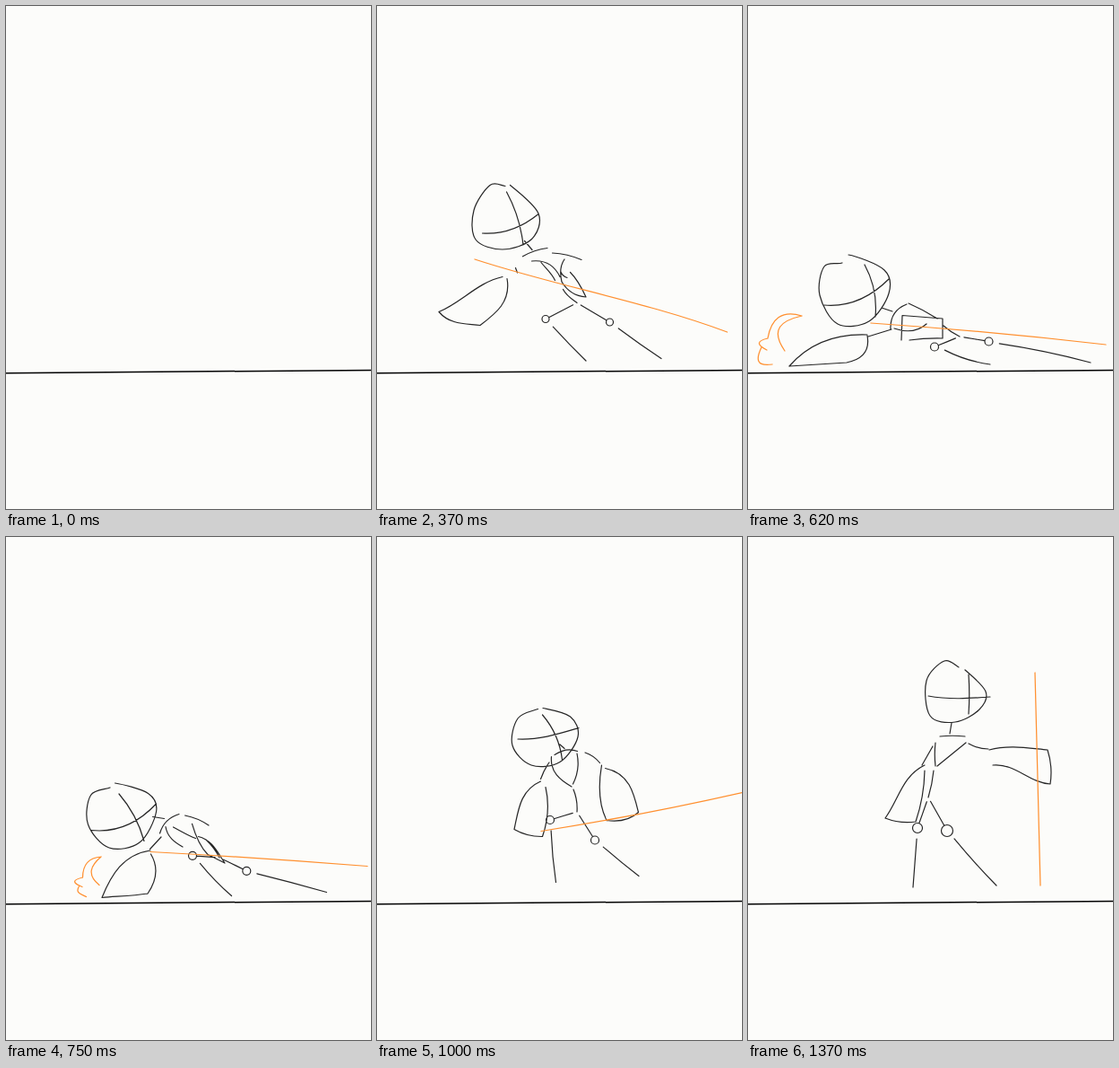
These frames come from a looping animation (407x560 px, 1.5 s). An HTML page:

```html
<!DOCTYPE html>
<html lang="en">
<head>
<meta charset="utf-8">
<title>Stick figure with staff</title>
<style>
html, body { margin: 0; width: 100%; height: 100%; overflow: hidden; background: #fcfcfa; }
svg { display: block; width: 407px; height: 560px; }
path { fill: none; stroke-linecap: round; stroke-linejoin: round; }
</style>
</head>
<body>
<svg viewBox="0 0 407 560">
  <path d="M0 408.7L407 405.4" stroke="#000" stroke-width="1.5"/>
  <path id="ink" stroke="#262626" stroke-width="1.2"/>
  <path id="staff" stroke="#ff9030" stroke-width="1.25"/>
</svg>
<script>
// A stroke runs from one point to another; the bows push its two thirds sideways.
const s = (x1, y1, x2, y2, bow = 0, bow2 = bow) => [x1, y1, x2, y2, bow, bow2];
// A leg is a knee with its radius, a foot and the bow of the shin.
const leg = (x, y, r, footX, footY, bow = 0) => [x, y, r, footX, footY, bow];
// A forearm has two sides; the cuff joins their ends.
const forearm = (outer, inner, bow = 0, bow2 = bow) => ({ outer, inner, cuff: [bow, bow2] });

const lean = {
  head: [[166, 129], [152, 128], [133, 160], [133, 191], [165, 199], [197, 188], [203, 162], [171, 132]],
  body: [
    s(172, 137, 179, 199, -4), s(144, 170, 199, 163, 4),
    s(174, 199, 176, 214), s(160, 217.5, 192, 218),
    s(163, 226, 187, 263, 10), s(198, 226, 187, 263, -6, -10),
    s(158, 225, 146, 242), s(203, 228, 219, 239, -3)
  ],
  left: forearm(s(133, 243, 76, 290, 2), s(140, 245, 115, 311, -22, -8), 4),
  right: forearm(s(213, 242, 177, 284, 9, 6), s(226, 243, 231, 297, -5, -3), 11),
  folds: [s(188, 260, 199, 251)],
  waist: s(198, 299, 198, 304),
  legs: [leg(168, 329, 4, 192, 400, 1), leg(229, 339, 4.5, 274, 401, 1)],
  staff: s(53, 237, 377, 347, 4, -18)
};
const crash = {
  head: [[120, 272], [100, 271], [83, 295], [87, 329], [115, 343], [148, 331], [157, 300], [126, 267]],
  body: [
    s(117, 277, 147, 333, -4), s(91, 336, 160, 301, 14, 12),
    s(155, 324, 170, 329), s(165, 340, 188, 321, -4),
    s(182, 342, 221, 340, -27), s(168, 345, 210, 348, 6),
    s(151, 358, 167, 352), s(188, 322, 237, 326, -1)
  ],
  left: forearm(s(147, 360, 62, 391, 14, -8), s(150, 362, 115, 400, -12, -9), 16, 2),
  right: forearm(s(205, 322, 235, 330), s(205, 350, 235, 351)),
  folds: [s(222, 332, 225, 354, 3)],
  waist: s(217, 332, 248, 357, 5, 2),
  legs: [leg(208, 368, 4, 274, 390), leg(290, 365, 3.5, 360, 384)],
  staff: s(165, 327, 404, 379, 3),
  puff: [s(59, 383, 18, 348, -9), s(17, 347, 17, 362, 2), s(17, 362, 3, 363, 3),
    s(3, 363, 0, 383, -10), s(0, 394, 26, 398, 2)]
};
const flat = {
  head: [[105, 286], [85, 290], [80, 322], [100, 354], [135, 351], [157, 320], [152, 294], [112, 277]],
  body: [
    s(130, 288, 142, 346, -6), s(85, 333, 157, 304, 13, 11),
    s(149, 336, 161, 340), s(159, 360, 177, 332, -8),
    s(172, 345, 171, 372), s(163, 359, 199, 354, 6, 8),
    s(160, 360, 134, 368), s(179, 331, 211, 348, -1)
  ],
  left: forearm(s(133, 366, 46, 401, 14, 16), s(133, 367, 110, 397, -14, -11)),
  right: forearm(s(172, 344.5, 217, 348), s(180, 372, 217, 370, -1)),
  waist: s(218, 356, 236, 368, 1),
  legs: [leg(208, 379.5, 4.5, 270, 399, 3), leg(268.5, 373.5, 4.5, 382, 397, -2)],
  staff: s(137, 353, 399, 377, -2),
  puff: [s(41, 384, 60, 345, -26, -18), s(60, 345, 22, 370, 18, 16),
    s(22, 370, 21, 383, 14, 10), s(15, 380, 27, 399, 12, 17)]
};
const push = {
  head: [[127, 272], [104, 285], [103, 318], [130, 338], [163, 329], [178, 292], [165, 277], [131, 271]],
  body: [
    s(122, 284, 166, 331, -3), s(105, 320, 178, 290, 15, 13),
    s(178, 287, 192, 287), s(184, 300, 209, 285, -3),
    s(184, 300, 223, 318, 12, 7), s(210, 287, 224, 317, -6),
    s(186, 308, 187, 327), s(220, 289, 241, 294, -3)
  ],
  left: forearm(s(189, 332, 168, 402, 22, 6), s(190, 339, 206, 397, -7, -6), 0, 2),
  right: forearm(s(243, 294, 233, 359, 5, 8), s(249, 295, 271, 356, -16, -4)),
  waist: s(228, 318, 240, 346, -4),
  legs: [leg(208, 330, 4.5, 233, 400), leg(268, 370, 4.5, 333, 394, 1)],
  staff: s(185, 348, 407, 356),
  puff: [s(167, 391, 152, 367, -4), s(152, 367, 149, 388, 2),
    s(149, 388, 149, 396, 11), s(149, 396, 152, 402, 8, -12)]
};
const rise = {
  head: [[232, 111], [210, 119], [199, 146], [214, 170], [245, 172], [270, 153], [266, 123], [239, 110]],
  body: [
    s(247, 112, 247, 165, -8), s(209, 130, 272, 135, -4, -8),
    s(230, 175, 226, 184), s(212, 185, 238, 192, -5, -7),
    s(205, 189, 211, 238, 10, 6), s(236, 195, 213, 233, -2),
    s(198, 194, 178, 212, 2), s(244, 191, 256, 209, -1)
  ],
  left: forearm(s(176, 212, 138, 249, 9, 6), s(186, 218, 163, 270, -4), 6, 4),
  right: forearm(s(258, 214, 279, 272, 6, 8), s(260, 220, 312, 257, -20, -14), 10, 13),
  waist: s(210, 244, 206, 266),
  legs: [leg(178, 300, 4.5, 166, 369, 2), leg(218, 305, 4.5, 251, 361)],
  staff: s(181, 307, 407, 213, 5)
};
const stand = {
  head: [[235, 145], [219, 138], [199, 160], [203, 199], [231, 206], [258, 192], [265, 172], [242, 148]],
  body: [
    s(246, 153, 246, 197, -1), s(201, 177, 270, 178, 4, 2),
    s(227, 207, 225, 219), s(214, 222, 242, 222, -1),
    s(209, 229, 209, 255, 1), s(243, 229, 211, 255),
    s(206, 233, 194, 254), s(246, 230, 268, 236, 2)
  ],
  left: forearm(s(197, 254, 153, 313, 13, 0), s(197, 260, 187, 317, -3), 3),
  right: forearm(s(273, 254, 337, 275, -10, 6), s(269, 237, 334, 237, -6, -2), 3),
  waist: s(207, 260, 201, 290, -1),
  legs: [leg(189, 324, 5.5, 184, 390), leg(222, 327, 6.5, 277, 388, 1)],
  staff: s(326, 388, 320, 151)
};

// The pose halfway between two poses, with the parts both of them have
function halfway(a, b) {
  if (typeof a === "number") return (a + b) / 2;
  if (Array.isArray(a)) return a.map((v, i) => halfway(v, b[i]));
  const shared = Object.keys(a).filter(key => key in b);
  return Object.fromEntries(shared.map(key => [key, halfway(a[key], b[key])]));
}

const xy = (...values) => values.map(v => v.toFixed(1)).join(" ");

function drawStroke([x1, y1, x2, y2, bow, bow2]) {
  const dx = x2 - x1, dy = y2 - y1, len = Math.hypot(dx, dy) || 1;
  const control = (t, b) => [x1 + dx * t - dy / len * b, y1 + dy * t + dx / len * b];
  return `M${xy(x1, y1)}C${xy(...control(1 / 3, bow), ...control(2 / 3, bow2), x2, y2)}`;
}

// Closed smooth outline whose last segment stays open
function drawHead(points) {
  const n = points.length, at = i => points[(i + n) % n];
  const handle = (i, sign) => [0, 1].map(k => at(i)[k] + sign * (at(i + 1)[k] - at(i - 1)[k]) / 6);
  let d = "M" + xy(...at(0));
  for (let i = 0; i < n - 1; i++) d += "C" + xy(...handle(i, 1), ...handle(i + 1, -1), ...at(i + 1));
  return d;
}

function drawForearm({ outer, inner, cuff }) {
  const end = stroke => stroke.slice(2, 4);
  return [outer, inner, [...end(outer), ...end(inner), ...cuff]].map(drawStroke).join("");
}

function drawLeg([x, y, r, footX, footY, bow], hipX, hipY) {
  const toward = (x1, y1, x2, y2, dist) => {
    const t = dist / Math.hypot(x2 - x1, y2 - y1);
    return [x1 + (x2 - x1) * t, y1 + (y2 - y1) * t];
  };
  const thigh = s(...toward(hipX, hipY, x, y, 5), ...toward(x, y, hipX, hipY, r));
  const shin = s(...toward(x, y, footX, footY, 12), footX, footY, bow);
  const knee = `M${xy(x - r, y)}a${r} ${r} 0 1 0 ${2 * r} 0a${r} ${r} 0 1 0 ${-2 * r} 0`;
  return drawStroke(thigh) + knee + drawStroke(shin);
}

function drawPose(pose) {
  if (!pose) return { ink: "", staff: "" };
  const { head, body, left, right, folds = [], waist, legs, staff, puff = [] } = pose;
  return {
    ink: drawHead(head) + [...body, ...folds, waist].map(drawStroke).join("")
      + drawForearm(left) + drawForearm(right)
      + legs.map(l => drawLeg(l, waist[2], waist[3])).join(""),
    staff: [staff, ...puff].map(drawStroke).join("")
  };
}

const timeline = [
  [0, null], [250, lean], [370, halfway(lean, crash)], [500, crash], [620, flat],
  [750, halfway(flat, push)], [870, push], [1000, halfway(push, rise)], [1120, rise],
  [1250, halfway(rise, stand)], [1370, stand]
].map(([start, pose]) => ({ start, paths: drawPose(pose) }));

const layers = ["ink", "staff"].map(id => document.getElementById(id));

function render(time) {
  const { paths } = timeline.filter(step => step.start <= time).pop();
  for (const layer of layers) layer.setAttribute("d", paths[layer.id]);
}

const origin = performance.now();
function tick() {
  render((performance.now() - origin) % 1500);
  requestAnimationFrame(tick);
}
tick();
</script>
</body>
</html>
```
